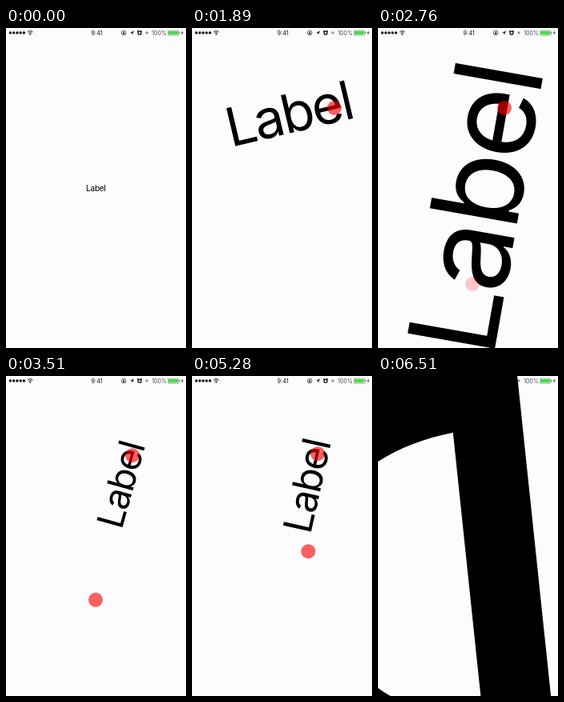
Animation of 225x400 px, one loop 6600 ms. Source, as an HTML page with a canvas:

```html
<!DOCTYPE html>
<html lang="en">
<head>
<meta charset="utf-8">
<title>Pinch, pan and rotate</title>
<style>
  html, body { margin: 0; width: 100%; height: 100%; overflow: hidden; background: #fcfcfe; }
  canvas { display: block; width: 225px; height: 400px; }
</style>
</head>
<body>
<canvas id="stage"></canvas>
<script>
const W = 225, H = 400, LOOP = 6600;
const SIZE = 10.2, TRACKING = -0.036;
const FONT = 'Inter, "Liberation Sans", sans-serif';
const INK = '#000', PAPER = '#fcfcfe', TOUCH = 'rgb(248,0,0)';
const canvas = document.getElementById('stage');
const ctx = canvas.getContext('2d');
const dpr = window.devicePixelRatio || 1;
canvas.width = W * dpr;
canvas.height = H * dpr;

const progress = (t, from, to) => Math.min(1, Math.max(0, (t - from) / (to - from)));
const ease = (t, from, to) => {
  const u = progress(t, from, to);
  return u * u * (3 - 2 * u);
};
const mix = (a, b, u) => a + (b - a) * u;
const bend = (a, c, b, u) => a.map((v, i) => mix(mix(v, c[i], u), mix(c[i], b[i], u), u));

// Each gesture multiplies the scale and adds to the angle while it lasts.
const SPREAD = { from: 780, to: 1090, scale: 6.57, turn: -21.5 };
const TWIST = { from: 1110, to: 1340, scale: 1, turn: 8.2 };
const NEAR = [112.5, 172], FAR = [112, 280];
const pinches = [{ from: 2190, to: 2740, scale: 2.27, turn: -66.7, path: [[80, 135], [75, 230], [118, 320]] }];
for (let i = 0; i < 3; i++) {
  const from = 2860 + i * 590;
  pinches.push({ from, to: from + 490, scale: 0.316, turn: 5.4, path: [FAR, FAR, NEAR] });
}
pinches.push({ from: 4530, to: 6201, scale: 245, turn: -32.2, path: [NEAR, [216, 193], [14, 378]], hold: 6300 });
const gestures = [SPREAD, TWIST, ...pinches];

// The label is held by its centre first, then by the bar of the "e".
const GRIP_TIME = 1410, GRIP = [0.835, 0.093];

function centre(t) {
  const turn = 2 * Math.PI * ease(t, 50, 680);
  const up = ease(t, 50, 680), settle = ease(t, 1110, 1340);
  return [112.5 - 28 * Math.sin(turn) - 2.5 * up + 3 * settle,
    240 - 40 * Math.cos(turn) - 12 * up + 4 * settle];
}

function grip(t) {
  const lift = ease(t, 1470, 1890), aside = ease(t, 1890, 2130), drift = ease(t, 4530, 6200);
  return [169 + 9 * lift - 20 * aside - 2 * drift,
    184 - 84 * lift - 2 * ease(t, 2800, 4500) - 2 * drift];
}

// Two fingers on opposite sides of a middle point.
function spreadFinger(side) {
  return t => {
    const reach = mix(16, 72, ease(t, SPREAD.from, SPREAD.to));
    const a = (22 - 23 * ease(t, SPREAD.from, SPREAD.to) + 7 * ease(t, TWIST.from, TWIST.to)) * Math.PI / 180;
    return [113 + side * reach * Math.cos(a), 195.5 + side * reach * Math.sin(a)];
  };
}

const touches = [
  { on: 30, off: 680, at: centre },
  { on: SPREAD.from, off: TWIST.to, at: spreadFinger(-1) },
  { on: SPREAD.from, off: TWIST.to, at: spreadFinger(1) },
  { on: 1470, off: 6300, at: grip },
  ...pinches.map(({ from, to, path, hold }) => (
    { on: from, off: hold || to, at: t => bend(...path, ease(t, from, to)) }))
];

function disc(x, y, r) {
  ctx.beginPath();
  ctx.arc(x, y, r, 0, Math.PI * 2);
  ctx.fill();
}

function arc(x, y, r, from, to, width) {
  ctx.lineWidth = width;
  ctx.beginPath();
  ctx.arc(x, y, r, from, to);
  ctx.stroke();
}

function shape(points) {
  ctx.beginPath();
  points.forEach(([x, y]) => ctx.lineTo(x, y));
  ctx.fill();
}

function write(text, x, y, size, weight, align, spacing) {
  ctx.font = `${weight} ${size}px ${FONT}`;
  ctx.letterSpacing = spacing + 'px';
  ctx.textAlign = align;
  ctx.fillText(text, x, y);
}

function drawLabel(t) {
  const held = t >= GRIP_TIME;
  const [x, y] = held ? grip(t) : centre(t);
  const [px, py] = held ? GRIP : [0, 0];
  let scale = SIZE / 100, angle = 0;
  for (const g of gestures) {
    const u = ease(t, g.from, g.to);
    scale *= g.scale ** u;
    angle += g.turn * u;
  }
  ctx.save();
  ctx.translate(x, y);
  ctx.rotate(angle * Math.PI / 180);
  ctx.scale(scale, scale);
  ctx.fillStyle = INK;
  ctx.font = `400 100px ${FONT}`;
  ctx.letterSpacing = TRACKING * 100 + 'px';
  ctx.textAlign = 'left';
  const m = ctx.measureText('Label');
  const mid = (m.actualBoundingBoxRight - m.actualBoundingBoxLeft) / 2;
  write('Label', -mid - px * 100, 36 - py * 100, 100, 400, 'left', TRACKING * 100);
  ctx.restore();
}

function drawTouches(t) {
  ctx.fillStyle = TOUCH;
  for (const { on, off, at } of touches) {
    const fade = off === 6300 ? 200 : 30;
    if (t < on || t >= off + fade) continue;
    ctx.globalAlpha = 0.62 * (1 - progress(t, off, off + fade));
    disc(...at(t), 9);
  }
  ctx.globalAlpha = 1;
}

function drawStatus() {
  ctx.globalCompositeOperation = 'multiply';
  ctx.fillStyle = ctx.strokeStyle = '#111';
  for (let i = 0; i < 5; i++) disc(5.4 + i * 4.25, 6, 1.7);
  for (const r of [2.6, 4.6]) arc(30.3, 8.3, r, -Math.PI * 0.76, -Math.PI * 0.24, 1);
  disc(30.3, 7.9, 0.9);
  write('9:41', 113.6, 8.6, 7.3, 400, 'center', 0);

  // orientation lock, location arrow, alarm clock
  arc(147.2, 6, 2.8, 0, Math.PI * 2, 0.6);
  arc(147.2, 5.6, 0.8, Math.PI, 0, 0.6);
  ctx.fillRect(146, 5.7, 2.4, 1.8);
  shape([[160, 3.6], [155, 6], [157.5, 6.2], [157.8, 8.7]]);
  arc(167, 6.2, 2, 0, Math.PI * 2, 1.3);
  disc(165, 4, 0.9);
  disc(169, 4, 0.9);

  ctx.fillStyle = '#999';
  disc(176, 6, 1.8);
  ctx.fillStyle = '#444';
  write('100%', 182.2, 8.6, 7, 400, 'left', 0);

  // battery
  ctx.strokeStyle = '#777';
  ctx.lineWidth = 0.4;
  ctx.strokeRect(202.3, 3, 13.8, 6.2);
  ctx.fillRect(216.5, 5, 0.8, 2.2);
  shape([[220.8, 3], [218.7, 6.4], [220.1, 6.4], [219.6, 9], [221.8, 5.5], [220.4, 5.5]]);
  ctx.globalCompositeOperation = 'source-over';
  ctx.fillStyle = '#4cd94f';
  ctx.fillRect(203, 3.7, 12.4, 4.8);
}

function frame(now) {
  const t = now % LOOP;
  ctx.setTransform(dpr, 0, 0, dpr, 0, 0);
  ctx.fillStyle = PAPER;
  ctx.fillRect(0, 0, W, H);
  drawLabel(t);
  drawStatus();
  drawTouches(t);
}

let start;
function tick(now) {
  if (start === undefined) start = now;
  frame(Math.max(0, now - start));
  requestAnimationFrame(tick);
}
frame(0);
requestAnimationFrame(tick);
</script>
</body>
</html>
```
